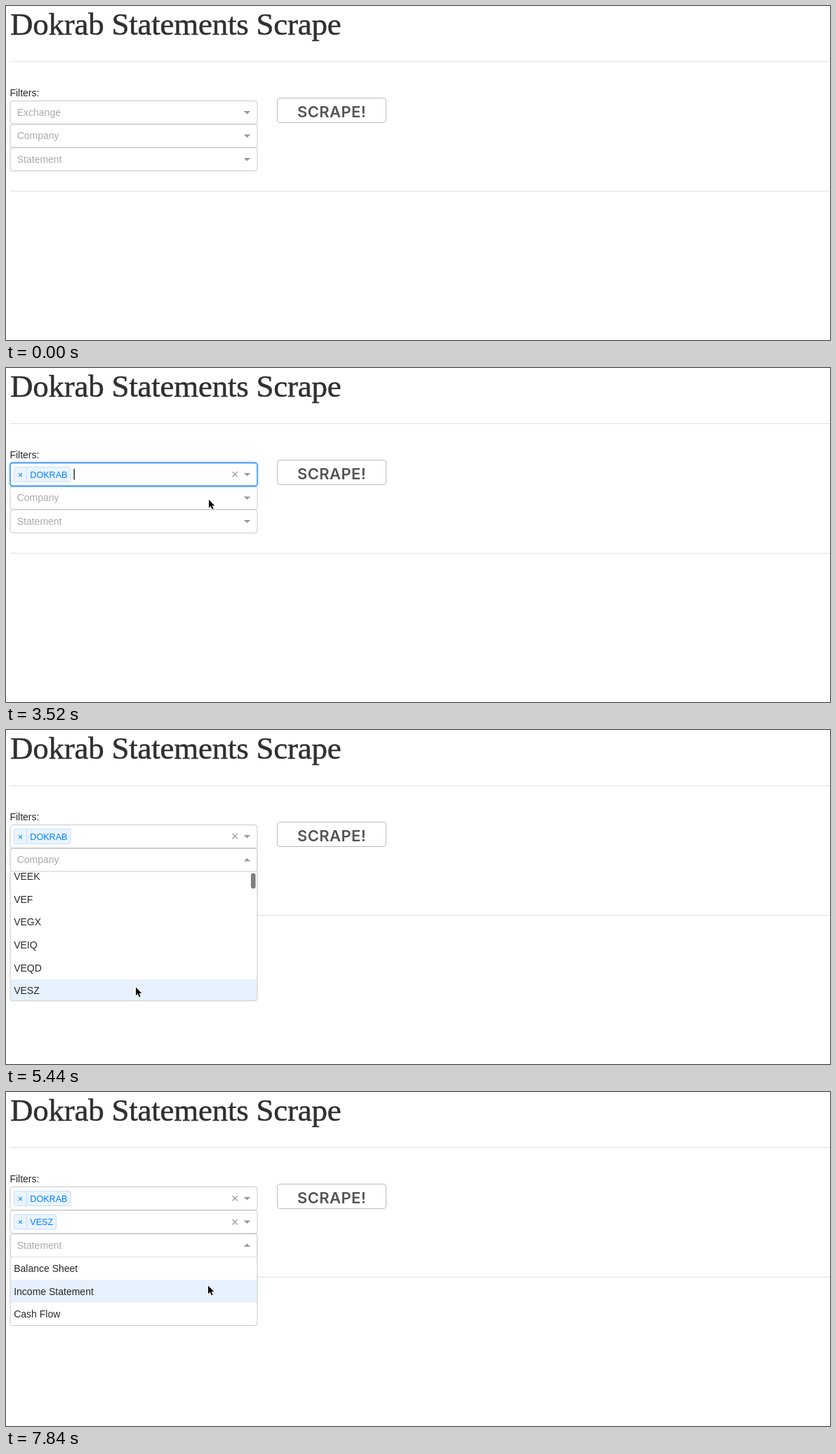
An HTML page that plays this animation: 1174 by 477 pixels, repeating every 8000 ms.

```html
<!DOCTYPE html>
<html lang="en">
<head>
<meta charset="utf-8">
<title>Statements Scrape</title>
<style>
  html, body { margin: 0; width: 100%; height: 100%; overflow: hidden; background: #fff; }
  svg { display: block; width: 100%; height: 100%; }
  text { font: 14px "Liberation Sans", Arial, sans-serif; fill: #292929; }
  .title { font: 45px "Liberation Serif", Georgia, serif; letter-spacing: -.25px; fill: #303030; stroke: #303030; stroke-width: .5px; }
  .button { font: 600 22px Inter, sans-serif; letter-spacing: .4px; fill: #555; text-anchor: middle; }
  .hint { fill: #aaa; }
  .chip { font-size: 12.6px; fill: #007eff; }
  .clear { font-size: 18px; fill: #999; }
  .mid { text-anchor: middle; }
</style>
</head>
<body>
<svg viewBox="0 0 1174 477">
  <defs>
    <clipPath id="list"><rect x="6.5" y="202.4" width="351" height="184.2"/></clipPath>
  </defs>
  <text class="title" x="6" y="40.5">Dokrab Statements Scrape</text>
  <path d="M6 79.5H1174M6 264.5H1174" stroke="#e1e1e1"/>
  <text x="5.4" y="129">Filters:</text>
  <rect x="386.5" y="131.5" width="155" height="35" rx="3.7" fill="#fff" stroke="#bbb"/>
  <text class="button" x="464.1" y="158.5">SCRAPE!</text>
  <g id="form"></g>
  <g id="pointer">
    <path d="M0 0V11.8L2.7 9.3L4.7 13.8L6.6 13L4.7 8.6H8.3Z" fill="#999" opacity=".35" transform="translate(.4 1.2)"/>
    <path d="M0 0V11.8L2.7 9.3L4.7 13.8L6.6 13L4.7 8.6H8.3Z" stroke="#fff" stroke-width="1.4" paint-order="stroke"/>
  </g>
</svg>
<script>
const LOOP = 8000, STEP = 160;
const ROW = 32.6, LEFT = 6, WIDTH = 352, BOX_H = 33;
const form = document.getElementById('form');
const pointer = document.getElementById('pointer');

// open: menu times; picked: when the choice becomes a chip; blur: when focus leaves
const fields = [
  { hint: 'Exchange', open: 1760, picked: 3200, blur: 3840, chip: 'DOKRAB', chipW: 80.5,
    options: ['BMUV', 'DOKRAB', 'RUKB'] },
  { hint: 'Company', open: 3840, picked: 6240, blur: 7200, chip: 'VESZ', chipW: 60,
    options: ['VEEK', 'VEF', 'VEGX', 'VEIQ', 'VEQD', 'VESZ'], maxH: 184.6 },
  { hint: 'Statement', open: 7200, picked: LOOP, blur: LOOP, chip: '', chipW: 0,
    options: ['Balance Sheet', 'Income Statement', 'Cash Flow'] }
];
fields.forEach((f, i) => { f.y = 135.5 + 33.5 * i; });

const caretOn = [[1760, 2240], [2720, 3680], [3840, 4480], [4960, 5440], [5920, 6720], [7200, 7520]];

// time, x, y of the pointer tip
const route = [
  [320, 371, 117], [1280, 342, 149.5], [1760, 342, 149.5], [1920, 341, 150], [2080, 341, 150],
  [2720, 290, 205.5], [2880, 290, 207], [3200, 290, 207], [3520, 289, 188], [3840, 289, 188],
  [4320, 290, 231], [5280, 200, 347], [5440, 185, 367.5], [6080, 185, 367.5], [6240, 188, 364],
  [6400, 188, 364], [7040, 350, 217], [7200, 350, 217], [7840, 288, 276.5], [LOOP, 288, 276.5]
];

const SCROLL_AT = 5440;
const clamp = v => Math.max(0, Math.min(1, v));
const ease = p => p * p * (3 - 2 * p);

function tipAt(t) {
  const i = Math.max(1, route.findIndex(k => k[0] >= t));
  const [t0, x0, y0] = route[i - 1], [t1, x1, y1] = route[i];
  const p = ease(clamp((t - t0) / (t1 - t0)));
  return { x: x0 + (x1 - x0) * p, y: y0 + (y1 - y0) * p };
}

const box = (x, y, w, h, rx, attrs) =>
  `<rect x="${x}" y="${y}" width="${w}" height="${h}" rx="${rx}" ${attrs}/>`;
const label = (x, y, text, cls = '', attrs = '') =>
  `<text x="${x}" y="${y}" class="${cls}" ${attrs}>${text}</text>`;

function arrow(y, up) {
  const d = up ? `M338.8 ${y + 18.6}h9.4l-4.7 -4.7z` : `M338.8 ${y + 14.4}h9.4l-4.7 4.7z`;
  return `<path d="${d}" fill="#999"/>`;
}

function chip(f) {
  const y = f.y + 6;
  return box(11.5, y, f.chipW, 21, 2, 'fill="#eaf4ff" stroke="#c2e0ff"') +
    `<path d="M29.5 ${y}v21" stroke="#c2e0ff"/>` +
    label(20.5, y + 15, '×', 'chip mid') + label(34.3, y + 15.2, f.chip, 'chip');
}

function control(f, t) {
  const isOpen = t >= f.open && t < f.picked;
  const focused = t >= f.picked && t < f.blur;
  let out = '';
  if (focused) out += box(LEFT - 1.5, f.y - 1.5, WIDTH + 3, BOX_H + 3, 5,
    'fill="none" stroke="#007eff" stroke-opacity=".12" stroke-width="3"');
  out += box(LEFT, f.y, WIDTH, BOX_H, 3.7,
    `fill="#fff" stroke="${focused ? '#1a86f0' : isOpen ? '#bbb' : '#c8c8c8'}" stroke-width="${focused ? 1.3 : 1}"`);
  if (t >= f.picked) {
    const fade = t - f.picked < STEP ? .25 : 1;
    out += chip(f) + label(326, f.y + 22.6, '×', 'clear mid', `opacity="${fade}"`);
  } else {
    out += label(15.7, f.y + 21.3, f.hint, 'hint');
  }
  out += arrow(f.y, isOpen);
  if ((isOpen || focused) && caretOn.some(([a, b]) => t >= a && t < b)) {
    const x = focused ? 16.6 + f.chipW : 16.2;
    out += `<path d="M${x} ${f.y + 8.5}v15.5" stroke="#000" stroke-width="1.2"/>`;
  }
  return out;
}

function menu(f, t, tip) {
  const top = f.y + 33.2;
  const full = f.options.length * ROW;
  const h = Math.min(full, f.maxH || full);
  const scroll = f.maxH && t >= SCROLL_AT ? 9.3 : 0;
  const active = Math.max(0, Math.min(f.options.length - 1, Math.floor((tip.y - top + scroll) / ROW)));
  const end = top + h;
  const frame = `M${LEFT} ${top}V${end - 3.5}q0 3.5 3.5 3.5H${LEFT + WIDTH - 3.5}q3.5 0 3.5 -3.5V${top}`;
  let rows = '';
  f.options.forEach((name, i) => {
    const y = top + i * ROW - scroll;
    if (i === active) rows += box(LEFT + .5, y, WIDTH - 1, ROW, 0, 'fill="#e6f1fd"');
    rows += label(11.2, y + 21.3, name);
  });
  let out = `<path d="${frame}z" fill="#fff"/>`;
  out += f.maxH ? `<g clip-path="url(#list)">${rows}</g>` : rows;
  out += `<path d="${frame}" fill="none" stroke="#c8c8c8"/>`;
  out += `<path d="M${LEFT + .5} ${top - .2}H${LEFT + WIDTH - .5}" stroke="#e2e2e2"/>`;
  if (scroll) {
    const fade = clamp((6080 - t) / 320);
    out += box(349, 204.5, 6.6, 22, 3.3, `fill="#7f7f7f" opacity="${fade}"`);
  }
  return out;
}

function draw(t) {
  const tip = tipAt(t);
  const current = fields.filter(f => t >= f.open && t < f.blur);
  const rest = fields.filter(f => !current.includes(f));
  const opened = current.filter(f => t < f.picked);
  form.innerHTML = [...rest, ...current].map(f => control(f, t)).join('') +
    opened.map(f => menu(f, t, tip)).join('');
  pointer.setAttribute('transform', `translate(${tip.x} ${tip.y})`);
  pointer.setAttribute('visibility', t < route[0][0] ? 'hidden' : 'visible');
}

const start = performance.now();
let shown = -1;
function tick() {
  const t = Math.floor(((performance.now() - start) % LOOP) / STEP) * STEP;
  if (t !== shown) draw(shown = t);
  requestAnimationFrame(tick);
}
tick();
</script>
</body>
</html>
```
